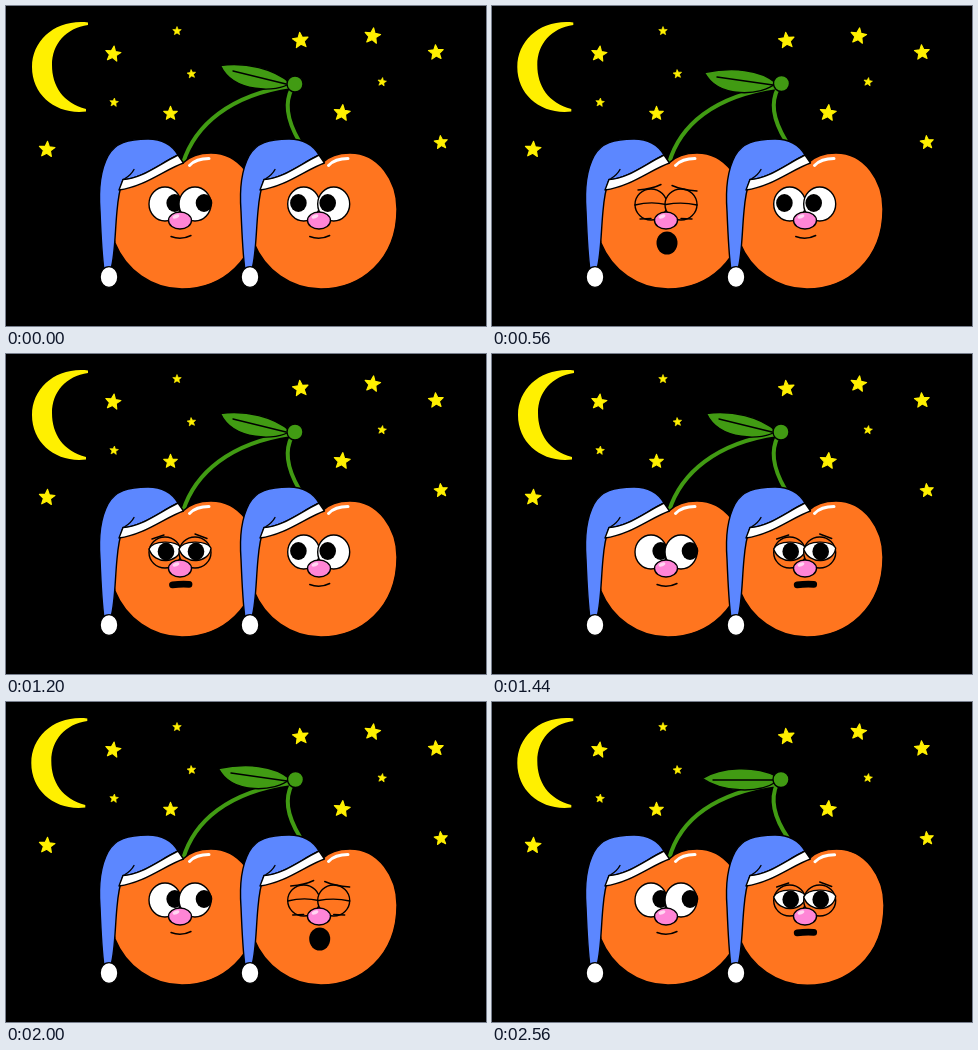
An HTML page without scripts for the animation above (2640 ms loop, 480 by 320 pixels).

```html
<!DOCTYPE html>
<html lang="en">
<head>
<meta charset="utf-8">
<title>Sleepy cherries</title>
<style>
  html, body { margin: 0; width: 100%; height: 100%; overflow: hidden; background: #000; }
  svg { display: block; width: 100%; height: 100%; }

  .ink { stroke: #000; stroke-width: 1.4; stroke-linejoin: round; stroke-linecap: round; }
  .line { fill: none; }
  .yellow { fill: #fff000; }
  .stars { stroke: #fff000; stroke-width: 1.4; stroke-linejoin: round; }
  .orange { fill: #ff751f; }
  .blue { fill: #5c87ff; }
  .white { fill: #fff; }
  .pink { fill: #ff85d6; }
  .green { fill: #419b13; }
  .stem { fill: none; stroke: #419b13; stroke-width: 4; }
  .shine { fill: none; stroke: #fff; stroke-width: 3; stroke-linecap: round; }
  .look { transform: translateX(var(--look)); }

  /* Three drawings alternate to make the lines wobble */
  .pose { animation: pose 240ms step-end infinite; }
  .pose.b { animation-delay: -160ms; }
  .pose.c { animation-delay: -80ms; }
  @keyframes pose { 0% { visibility: visible } 33.33%, 100% { visibility: hidden } }

  /* Each cherry gets tired, yawns, then wakes up, one after the other */
  .face { --look: 8.7px; --delay: 0ms; }
  .face.right { --look: -6.3px; --delay: -1440ms; }
  .face > use { animation: 2640ms step-end var(--delay) infinite; }
  .face > .awake { animation-name: awake; }
  .face > .tired { animation-name: tired; }
  .face > .yawn { animation-name: yawn; }
  @keyframes awake { 0%, 54.54%, 100% { visibility: visible } 9.09% { visibility: hidden } }
  @keyframes tired { 0%, 18.18%, 54.54%, 100% { visibility: hidden } 9.09%, 45.45% { visibility: visible } }
  @keyframes yawn { 0%, 45.45%, 100% { visibility: hidden } 18.18% { visibility: visible } }
</style>
</head>
<body>
<svg viewBox="0 0 480 320">
  <defs>
    <path id="star" d="M0-10 2.6-3.6 9.5-3.1 4.3 1.4 5.9 8.1 0 4.5-5.9 8.1-4.3 1.4-9.5-3.1-2.6-3.6Z"/>
    <path id="moon" class="yellow" d="M82 16.500C50 13 26 34 26 61C26 90 51 109 80 105.500L80 103C57 97 46 80 46 59C46 38 60 22 82 19Z"/>

    <g id="cherry">
      <path class="orange ink" d="M177 157C184 150 194 147 205 147C234 147 252 175 252 203C252 255 215 283 176 283C146 283 120 264 109 237C100 200 110 165 140 158Z"/>
      <path class="shine" d="M183.500 159.500Q190 152.500 203 152.500"/>
    </g>

    <g id="hat" class="ink">
      <path class="blue" d="M172 149C165 137 155 133 142 133C122 133 109 137 102 150C94 165 92.500 185 94 205C95 230 96 250 98 264L105 263C109 250 109 225 111 205C112 193 113 185 117 173.500C135 173 152 159 172 149Z"/>
      <path class="white" d="M172 149L177.500 157C158 164 138 181 113 184L117 173.500C135 173 152 159 172 149Z"/>
      <path class="line" d="M119 172.500Q125 169 128 163.500"/>
      <ellipse class="white" cx="103" cy="271" rx="8.900" ry="10.400"/>
    </g>

    <ellipse id="eye" class="ink" cx="159" cy="198" rx="16" ry="17"/>
    <ellipse id="lid" class="ink" cx="159" cy="198.500" rx="16" ry="15.500"/>
    <ellipse id="pupil" cx="160" cy="197" rx="8.300" ry="9"/>

    <g id="nose">
      <ellipse class="pink ink" cx="174" cy="214.500" rx="11.500" ry="8.500"/>
      <ellipse cx="170" cy="210.500" rx="3.500" ry="1.800" fill="#ffd5f1" transform="rotate(-20 170 210.500)"/>
    </g>

    <g id="awake">
      <use href="#eye" class="white"/>
      <use href="#pupil" class="look"/>
      <g transform="translate(30)">
        <use href="#eye" class="white"/>
        <use href="#pupil" class="look" x="-.7"/>
      </g>
      <path class="line ink" d="M165 230.500Q175 234.500 185 229.500"/>
    </g>

    <g id="tired-eye">
      <use href="#lid" class="orange"/>
      <path class="white ink" d="M143 195C147 186 170 186 175 194C173 210 148 211 143 195Z"/>
      <use href="#pupil" y=".5"/>
    </g>
    <g id="tired">
      <use href="#tired-eye"/>
      <use href="#tired-eye" x="30"/>
      <path class="line ink" d="M146 185L158 181M189 180L201 184.500"/>
      <path class="line" d="M166.500 230.800Q175 229.800 183 230.300" stroke="#000" stroke-width="6.800" stroke-linecap="round"/>
    </g>

    <g id="yawn">
      <use href="#lid" class="orange"/>
      <use href="#lid" class="orange" x="30"/>
      <path class="line ink" d="M143 199Q159 195 174 198.500Q190 195.500 205 199M146 184Q160 183 169 178.500M180 179.500Q190 184 205 185M148 213L159 212.500M189 212.500L200 213"/>
      <ellipse cx="175" cy="237" rx="10.500" ry="11.500"/>
    </g>
  </defs>

  <rect width="480" height="320"/>

  <g class="yellow stars">
    <use href="#star" transform="translate(107 48) rotate(8) scale(.8)"/>
    <use href="#star" transform="translate(171 25) scale(.45)"/>
    <use href="#star" transform="translate(185.500 68) rotate(-6) scale(.45)"/>
    <use href="#star" transform="translate(108 96.500) rotate(6) scale(.45)"/>
    <use href="#star" transform="translate(164.500 107.500) scale(.72)"/>
    <use href="#star" transform="translate(41 143.500) rotate(4) scale(.82)"/>
    <use href="#star" transform="translate(294.500 34.500) rotate(-6) scale(.82)"/>
    <use href="#star" transform="translate(366.500 30) rotate(8) scale(.82)"/>
    <use href="#star" transform="translate(430 46.500) rotate(-4) scale(.78)"/>
    <use href="#star" transform="translate(376 76) rotate(8) scale(.45)"/>
    <use href="#star" transform="translate(336 107) rotate(6) scale(.84)"/>
    <use href="#star" transform="translate(435 136.500) rotate(-6) scale(.7)"/>
  </g>

  <g class="pose a">
    <use href="#moon"/>
    <path class="stem" d="M177 157C189 119 224 89 285 80M286 82C279 96 280 112 293 135"/>
    <path class="green ink" d="M214.500 59.500C240 56 268 63 284 77C272 87 227 87 214.500 59.500Z"/>
    <path class="line ink" d="M227 65L280 78"/>
    <circle class="green ink" cx="289" cy="78" r="8"/>
    <use href="#cherry"/>
    <use href="#cherry" x="139"/>
  </g>
  <g class="pose b">
    <use href="#moon" x="-.7"/>
    <path class="stem" d="M177 157C188 119 222 90 285 81M286 82C279 96 280 112 294 135"/>
    <path class="green ink" d="M212.500 66.500C240 61 268 63 284 77C270 90 226 93 212.500 66.500Z"/>
    <path class="line ink" d="M225 71L281 79"/>
    <circle class="green ink" cx="289.500" cy="77.500" r="8"/>
    <use href="#cherry"/>
    <use href="#cherry" x="139"/>
  </g>
  <g class="pose c">
    <use href="#moon" x="-.7"/>
    <path class="stem" d="M177 157C187 120 218 92 285 82M285 82C278 97 281 114 296 136"/>
    <path class="green ink" d="M210.500 76.500C230 64 264 64 284 74L284 80C266 92 230 90 210.500 76.500Z"/>
    <path class="line ink" d="M221 78L281 78"/>
    <circle class="green ink" cx="289" cy="77.500" r="8"/>
    <use href="#cherry"/>
    <use href="#cherry" transform="translate(138) scale(1.008 1.001)"/>
  </g>

  <use href="#hat"/>
  <use href="#hat" x="141"/>

  <g class="face">
    <use href="#awake" class="awake"/>
    <use href="#tired" class="tired"/>
    <use href="#yawn" class="yawn"/>
  </g>
  <g class="face right" transform="translate(138.700)">
    <use href="#awake" class="awake"/>
    <use href="#tired" class="tired"/>
    <use href="#yawn" class="yawn"/>
  </g>
  <use href="#nose"/>
  <use href="#nose" x="139"/>
</svg>
</body>
</html>
```
